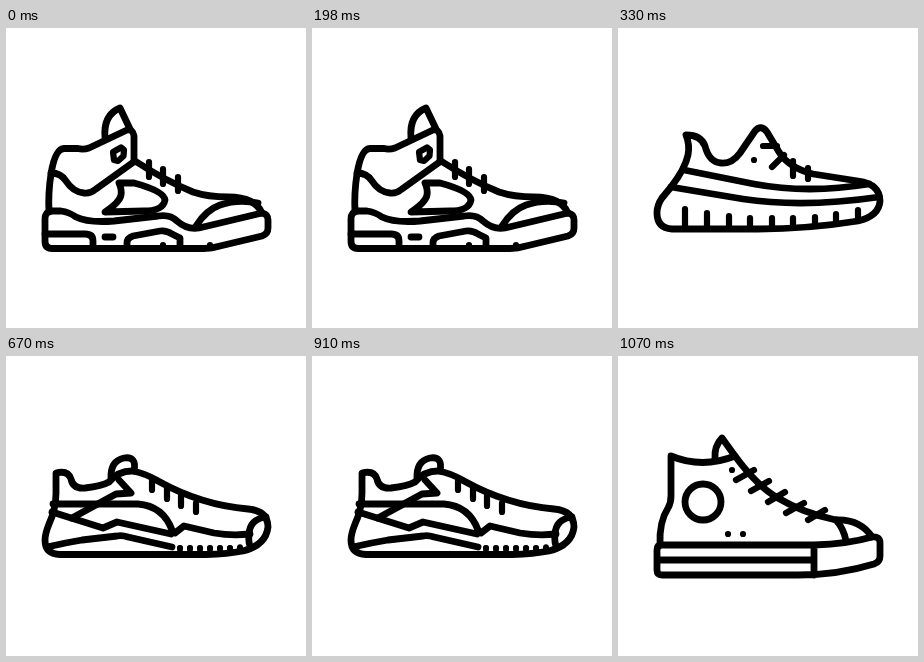
An HTML page for the animation above (1.33 s loop, 300 by 300 pixels).

```html
<!DOCTYPE html>
<html lang="en">
<head>
<meta charset="utf-8">
<title>Sneakers</title>
<style>
  html, body { margin: 0; width: 100%; height: 100%; overflow: hidden; background: #fff; }
  svg { display: block; width: 100%; height: 100%; }
  g { fill: none; stroke: #000; stroke-width: 6.8; stroke-linecap: round; stroke-linejoin: round; visibility: hidden; }
  .detail { stroke-width: 6.2; }
</style>
</head>
<body>
<svg viewBox="0 0 300 300">
  <!-- basketball shoe -->
  <g>
    <path d="M45 183Q39 184 39 191V213Q39 220.5 46 220.5H198Q206 220.5 214 218L256 208Q262 206 262 200V192Q262 186 256 185"/>
    <path d="M43 184Q42 165 45 146Q49 121 58 120.500H72Q77 122 83 120L121 102Q127 101 128 108V132"/>
    <path d="M99 110Q97 87 114 80L124 101"/>
    <path class="detail" d="M107 124L115 119.500L118 122L117.500 128L112 133L108 132Z"/>
    <path d="M45 145Q55 145 60 153Q67 164 78 165Q84 166 90 161L129 133Q160 153 187 164Q202 169 222 169Q249 169 256 185"/>
    <path class="detail" d="M143 134V149M157 141V156M172 149V163"/>
    <path d="M113 155H128Q158 163 159 172Q157 183 138 183L99 184Q114 174 115 167Q116 162 113 155Z"/>
    <path d="M45 183H55Q63 184 70 189Q82 195 108 193L152 188Q164 186 171 193Q181 202 193 200L256 185"/>
    <path d="M190 198Q200 182 214 177Q232 171 252 175"/>
    <path d="M39 206H79Q87 206 87 213V219M99 209H107M121 219V215Q121 210 127 208L154 203Q160 202 166 206L174 210V219"/>
    <path class="detail" d="M157 217V219M204 217V219"/>
  </g>
  <!-- knit runner -->
  <g>
    <path d="M68 107Q83 107 87 118Q91 134 103 135Q114 136 122 125L137 103Q143 96 149 104L161 124Q171 140 195 146L240 153Q262 156 262 173Q261 188 240 193Q190 201 140 201H54Q39 200 39 185Q39 177 44 170L53 159Q67 141 70 127Q72 117 68 107Z"/>
    <path d="M66 142L136 156Q190 166 251 156M53 159L125 171Q185 180 261 169"/>
    <path class="detail" d="M67 181V200M89 185V200M111 188V200M132 190V200M154 190V200M175 190V200M197 189V198M218 186V196M240 182V192"/>
    <path class="detail" d="M145 118H159M154 139L166 127M175 133V148M190 140V151M136 132h.01"/>
  </g>
  <!-- trail runner -->
  <g>
    <path d="M50 117Q62 114 65 123Q67 133 79 132Q96 130 103 126Q112 115 126 115Q139 117 152 125Q195 149 242 153Q262 155 262 171Q260 189 237 195Q222 198 200 198.500H54Q39 198 39 184Q39 178 43 168Q50 153 50 137Z"/>
    <path d="M105 123Q104 105 118 102Q131 100 128 115M113 124L125 137L110 138L66 162"/>
    <path d="M47 148H132Q157 150 166 174L169 177L178 170L208 177Q226 180 244 178"/>
    <path d="M46 156L97 172L111 166L165 178"/>
    <path d="M41 191Q58 187 76 184L111 180Q116 179 122 181L166 191"/>
    <path d="M260 161Q244 163 243 178Q242 187 245 192"/>
    <path class="detail" d="M146 125V134M161 132V143M175 140V150M190 147V156"/>
    <path class="detail" stroke-dasharray="0 10" d="M174 192H236"/>
    <path d="M174 197V192M184 197V192M194 197V192M204 197V192M214 197V192M224 197V192M234 195V191" stroke-width="5.5"/>
  </g>
  <!-- canvas high-top -->
  <g>
    <path d="M42 189Q41 166 50 152Q53 147 53 140V100Q84 113 117 100Q140 131 160 142Q185 157 218 164Q242 163 254 181"/>
    <path d="M97 103Q96 90 104 82L117 100M218 164Q226 173 228 185"/>
    <path d="M44 189H196Q230 188 254 181Q262 180 262 187V200Q262 206 256 208Q220 219 180 219H44Q39 219 39 214V194Q39 189 44 189ZM39 204H196M196 189V219"/>
    <circle cx="85" cy="146" r="18"/>
    <path class="detail" d="M118 124L136 114M133 135L151 125M150 146L167 136M168 157L186 147M190 164L207 154"/>
    <path class="detail" d="M114 114h.01M110 178h.01M125 178h.01"/>
  </g>
</svg>
<script>
  const ends = [330, 670, 1070, 1330];
  const loop = ends[ends.length - 1];
  const shoes = document.querySelectorAll('g');
  const start = performance.now();

  function draw(now) {
    const time = Math.max(0, now - start) % loop;
    const current = ends.findIndex(end => time < end);
    shoes.forEach((shoe, i) => shoe.style.visibility = i === current ? 'visible' : 'hidden');
    requestAnimationFrame(draw);
  }
  draw(start);
</script>
</body>
</html>
```
